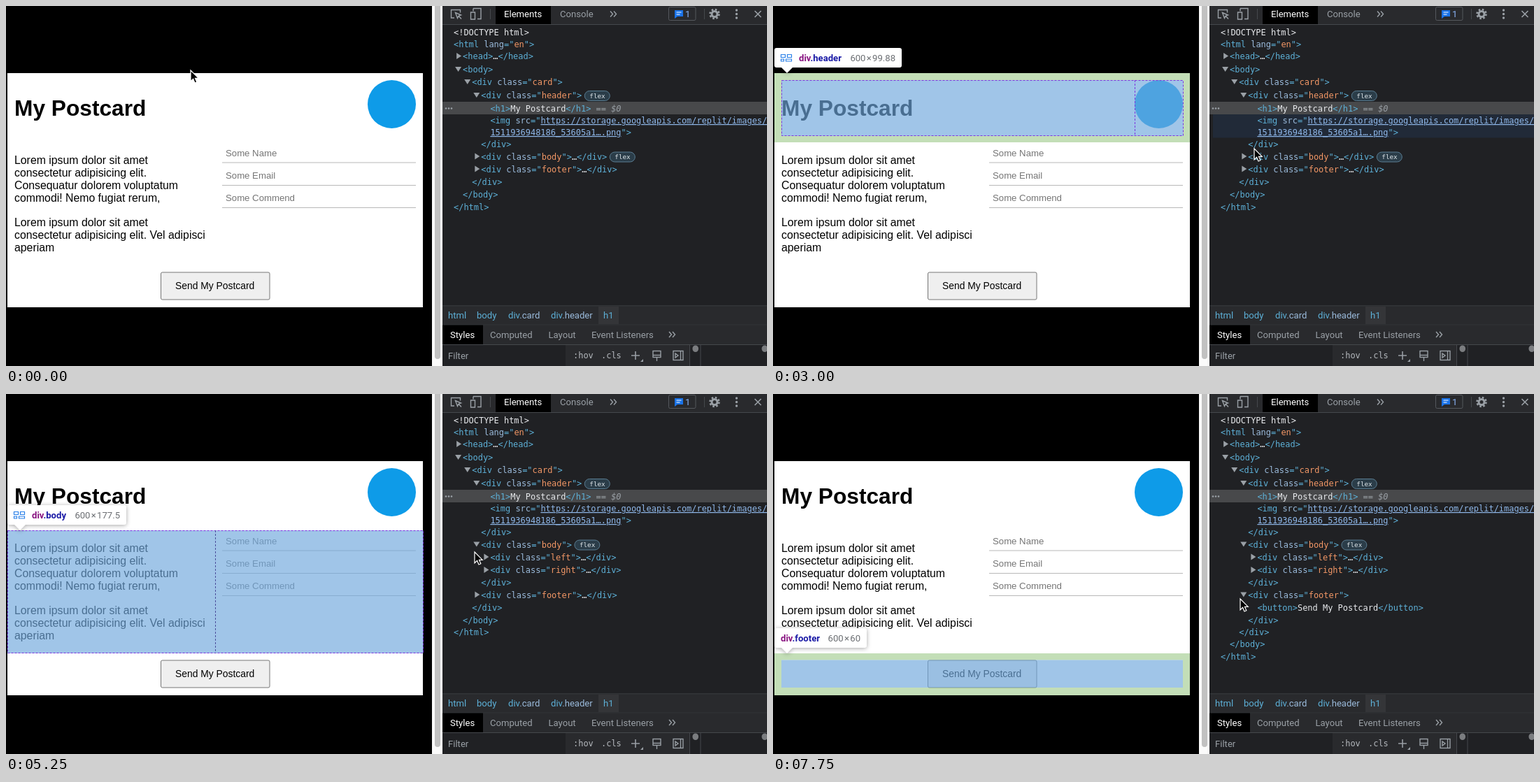
An HTML page for the animation above (8 s loop, 1088 by 515 pixels).

```html
<!DOCTYPE html>
<html lang="en">
<head>
<meta charset="utf-8">
<title>Inspecting a postcard</title>
<style>
  html, body { margin: 0; width: 100%; height: 100%; overflow: hidden; background: #000; }
  svg { display: block; width: 1088px; height: 515px; }
  text { white-space: pre; }
  .page { font: 15.84px "Liberation Sans", Arial, sans-serif; }
  .page .title { font-size: 31.68px; font-weight: bold; }
  .page .hint { font-size: 13.2px; fill: #757575; }
  .page .send { font-size: 13.86px; }
  .ui { font: 13.1px Roboto, "Liberation Sans", sans-serif; fill: #9aa0a6; }
  .ui .on { fill: #fff; }
  .crumbs { fill: #5db0d7; }
  .crumbs .cls { fill: #9bbbdc; }
  .code { font: 11.96px "DejaVu Sans Mono", monospace; fill: #e8eaed; }
  .tag { fill: #5db0d7; }
  .attr { fill: #9bbbdc; }
  .val { fill: #f29766; }
  .link { fill: #8fb8ea; text-decoration: underline; }
  .dim { fill: #9aa0a6; font-style: italic; }
  .badge { font-size: 9.3px; fill: #dfe6ea; }
  .twist { fill: #9aa0a6; }
  .line { fill: none; stroke: #9aa0a6; stroke-width: 1.4; }
  .content { fill: rgba(111, 168, 220, .66); }
  .padding { fill: rgba(147, 196, 125, .55); fill-rule: evenodd; }
  .margin { fill: rgba(246, 178, 107, .66); fill-rule: evenodd; }
  .flex { fill: none; stroke: #7d35e0; stroke-dasharray: 3 2; }
  .tip { font: 13.1px Roboto, "Liberation Sans", sans-serif; fill: #6b6e72; }
  .tip .el { font-weight: bold; fill: #881280; }
  .tip .el tspan { fill: #1a1aa6; }
  .bubble { fill: #fff; filter: drop-shadow(0 1px 3px rgba(0, 0, 0, .35)); }
</style>
</head>
<body>
<svg viewBox="0 0 1088 515">
  <rect width="1088" height="515"/>

  <g class="page">
    <rect x="2" y="96" width="594" height="335" fill="#fff"/>
    <text class="title" x="12" y="157">My Postcard</text>
    <circle cx="551.5" cy="140.5" r="34.5" fill="#0e9be8"/>
    <text x="12" y="225.5">Lorem ipsum dolor sit amet</text>
    <text x="12" y="244">consectetur adipisicing elit.</text>
    <text x="12" y="262">Consequatur dolorem voluptatum</text>
    <text x="12" y="280">commodi! Nemo fugiat rerum,</text>
    <text x="12" y="315">Lorem ipsum dolor sit amet</text>
    <text x="12" y="333">consectetur adipisicing elit. Vel adipisci</text>
    <text x="12" y="351">aperiam</text>
    <text class="hint" x="314" y="215">Some Name</text>
    <text class="hint" x="314" y="247">Some Email</text>
    <text class="hint" x="314" y="279">Some Commend</text>
    <path d="M309 224h277M309 256.500h277M309 288.500h277" stroke="#b8b8b8"/>
    <rect x="221.500" y="381" width="155.500" height="39" rx="2" fill="#efefef" stroke="#767676"/>
    <text class="send" x="242" y="405">Send My Postcard</text>
  </g>

  <rect x="609" width="15" height="515" fill="#fafafa"/>
  <rect x="613" y="-10" width="8" height="515" rx="4" fill="#c1c1c1"/>

  <g class="ui">
    <rect x="624" width="464" height="515" fill="#202124"/>
    <rect x="624" width="464" height="26" fill="#292a2d"/>
    <path d="M624 26.500h464M624 429h464M624 456h464M624 484.500h464" stroke="#45484c"/>
    <rect x="700" width="79" height="26" fill="#000"/>
    <g class="line">
      <path d="M641 17h-4.500v-11.500h13v4M642.500 9.500l8 3.500-3.500 1.200-1.500 3.300zM647 14l4 4.500"/>
      <path d="M668 3.500h11v15h-5M668 3.500v4M664.500 9h6v10h-6z"/>
      <path d="M692.500 4v15M998.500 4v15" stroke="#45484c" stroke-width="1"/>
      <path d="M864 7.500l3.500 4-3.500 4M869 7.500l3.500 4-3.500 4M948 466l3.500 4-3.500 4M953 466l3.500 4-3.500 4"/>
      <rect x="947.500" y="1.500" width="38.500" height="19" rx="2" stroke="#55585d" stroke-width="1"/>
      <circle cx="1013" cy="11.500" r="4" stroke-width="3"/>
      <circle cx="1013" cy="11.500" r="6.500" stroke-width="2.500" stroke-dasharray="2.550"/>
      <path d="M1070.500 7l9 9M1079.500 7l-9 9" stroke-width="1.600"/>
      <path d="M894 500h12M900 494v12" stroke-width="1.600"/>
      <path d="M925 493.500h11v6h-11zM925 499.500v3h11v-3M930.500 503v5M954 493.500h14v13h-14zM964.500 493.500v13M957 497l4 3-4 3z"/>
    </g>
    <path d="M956 6h12v9h-8l-4 3z" fill="#1a73e8"/>
    <path d="M958.500 9h7M958.500 12h5" stroke="#fff"/>
    <text x="971" y="16" fill="#8ab4f8">1</text>
    <g class="twist">
      <circle cx="1044.500" cy="6" r="1.700"/><circle cx="1044.500" cy="11.500" r="1.700"/><circle cx="1044.500" cy="17" r="1.700"/>
    </g>
    <text class="on" x="712" y="16">Elements</text>
    <text x="792" y="16">Console</text>

    <rect x="624" y="429.500" width="464" height="26" fill="#292a2d"/>
    <rect x="847" y="430" width="29" height="25" fill="#343538"/>
    <g class="crumbs">
      <text x="632" y="447">html</text>
      <text x="673" y="447">body</text>
      <text x="718" y="447">div<tspan class="cls">.card</tspan></text>
      <text x="779" y="447">div<tspan class="cls">.header</tspan></text>
      <text x="854" y="447">h1</text>
    </g>
    <rect x="624" y="456.500" width="464" height="27.500" fill="#292a2d"/>
    <rect x="624" y="456.500" width="58" height="27.500" fill="#000"/>
    <path d="M948 466l3.500 4-3.500 4M953 466l3.500 4-3.500 4" class="line"/>
    <text class="on" x="635" y="474.500">Styles</text>
    <text x="692" y="474.500">Computed</text>
    <text x="775.500" y="474.500">Layout</text>
    <text x="837" y="474.500">Event Listeners</text>

    <rect x="800" y="485" width="177" height="30" fill="#292a2d" style="mix-blend-mode:lighten"/>
    <text x="632" y="504.500">Filter</text>
    <g class="code" font-weight="bold" style="fill:#b4b8bd">
      <text x="811" y="504">:hov</text>
      <text x="851" y="504">.cls</text>
    </g>
    <path d="M911 505v4h-4z" class="twist"/>
    <path d="M977.500 485v30M993 485v30" stroke="#45484c"/>
    <rect x="981.500" y="485.500" width="8.500" height="9.500" rx="4.200" fill="#7b7d80"/>
    <rect x="1080.500" y="485.500" width="8.500" height="9.500" rx="4.200" fill="#7b7d80"/>
  </g>

  <rect x="624" y="137" width="464" height="18" fill="#48494b"/>
  <rect id="hover" x="629" width="459" fill="#212a38"/>
  <g class="twist"><circle cx="629" cy="146.500" r="1.300"/><circle cx="633" cy="146.500" r="1.300"/><circle cx="637" cy="146.500" r="1.300"/></g>
  <g id="tree" class="code"></g>
  <g id="overlays"></g>
  <path id="cursor" d="M0 0V15.800L3.600 12.400L6 18L8.800 16.800L6.400 11.300H11.200Z" fill="#000" stroke="#fff" stroke-width="1.200"/>
</svg>
<script>
const $ = id => document.getElementById(id);
const slots = [37.5, 55, 72, 91, 109, 128, 146.5, 164, 181, 197.5, 215.5, 233.5, 252, 269.5, 287.5, 306, 324, 341, 358, 376];
const CHAR = 7.2;

const span = (cls, text) => `<tspan class="${cls}">${text}</tspan>`;
const safe = s => s.replace(/</g, '&lt;').replace(/>/g, '&gt;');

function paint(code) {
  return code.replace(/(<\/?\w+|>)|( \w+)="([^"]*)"|(<!)/g, (all, tag, attr, val) =>
    tag ? span('tag', safe(tag))
    : attr ? span('attr', attr) + span('tag', '="') + span('val', val) + span('tag', '"')
    : safe(all));
}

const put = (x, y, inner) => `<text x="${x}" y="${y + 4}">${inner}</text>`;

// kind: "+" collapsed, "-" expanded; "f" adds the flex badge
function row(slot, depth, code, kind = '') {
  const x = 640 + 13.1 * depth, y = slots[slot];
  let out = put(x, y, paint(code));
  if (kind[0] === '+') out += `<path class="twist" d="M${x - 9} ${y - 5}l7 4.500-7 4.500z"/>`;
  if (kind[0] === '-') out += `<path class="twist" d="M${x - 11} ${y - 4}h9l-4.500 7z"/>`;
  if (kind[1] === 'f') {
    const bx = x + code.length * CHAR + 4;
    out += `<rect x="${bx}" y="${y - 6.5}" width="36" height="14" rx="7" fill="#2b3d49" stroke="#5a7d92"/>` +
      `<text class="badge" x="${bx + 7}" y="${y + 3.5}">flex</text>`;
  }
  return out;
}

const top10 =
  put(640, slots[0], '&lt;!DOCTYPE html&gt;') +
  row(1, 0, '<html lang="en">') +
  row(2, 1, '<head>…</head>', '+') +
  row(3, 1, '<body>', '-') +
  row(4, 2, '<div class="card">', '-') +
  row(5, 3, '<div class="header">', '-f') +
  put(692.4, slots[6], paint('<h1>My Postcard</h1>') + span('dim', ' == $0')) +
  put(692.4, slots[7], span('tag', '&lt;img') + span('attr', ' src') + span('tag', '="') +
    span('link', 'https://storage.googleapis.com/replit/images/')) +
  put(692.4, slots[8], span('link', '1511936948186_53605a1….png') + span('tag', '"&gt;')) +
  row(9, 3, '</div>');

const closing = slot => row(slot, 2, '</div>') + row(slot + 1, 1, '</body>') + row(slot + 2, 0, '</html>');
const footer = (slot, open) => open
  ? row(slot, 3, '<div class="footer">', '-') + row(slot + 1, 4, '<button>Send My Postcard</button>') +
    row(slot + 2, 3, '</div>') + closing(slot + 3)
  : row(slot, 3, '<div class="footer">…</div>', '+') + closing(slot + 1);
const openBody =
  row(10, 3, '<div class="body">', '-f') +
  row(11, 4, '<div class="left">…</div>', '+') +
  row(12, 4, '<div class="right">…</div>', '+') +
  row(13, 3, '</div>');
const tails = [
  row(10, 3, '<div class="body">…</div>', '+f') + footer(11, false),
  openBody + footer(14, false),
  openBody + footer(14, true)
];
$('tree').innerHTML = top10 + tails.map(t => `<g>${t}</g>`).join('');

const frame = ([x, y, w, h]) => `M${x} ${y}h${w}v${h}h${-w}z`;
const fill = (cls, ...boxes) => `<path class="${cls}" d="${boxes.map(frame).join('')}"/>`;

function tip(x, target, w, tag, cls, size, flex) {
  const y = target - 36, tx = x + (flex ? 35 : 9);
  const icon = flex ? `<path d="M${x + 9.5} ${y + 9.5}h6v4h-6zM${x + 18.5} ${y + 9.5}h6v4h-6zM${x + 9.5} ${y + 16}h4v3h-4zM${x + 16.5} ${y + 16}h8v3h-8z" fill="none" stroke="#2a80e8" stroke-width="1.200"/>` : '';
  return `<g class="tip"><path class="bubble" d="M${x + 3} ${y}h${w - 6}q3 0 3 3v22q0 3-3 3H${x + 26}l-8 8-8-8H${x + 3}q-3 0-3-3v-22q0-3 3-3z"/>${icon}` +
    `<text class="el" x="${tx}" y="${y + 18.5}">${tag}<tspan>${cls}</tspan></text>` +
    `<text x="${x + w - 9}" y="${y + 18.5}" text-anchor="end">${size.replace('×', '\u200a×\u200a')}</text></g>`;
}

const headBox = [12, 106, 574.5, 80], bodyBox = [2, 195, 594.5, 176];
const heading = [12, 127.5, 188, 37], leftBox = [12, 195, 277, 176], rightBox = [309, 195, 277, 176];
const footBox = [12, 380.5, 574, 39.5];
const overlays = {
  h1: fill('margin', [12, 106, 188, 80], heading) + fill('content', heading) + tip(12, 106, 118, 'h1', '', '190.27×37'),
  img: fill('content', [517, 106, 69, 69.5]) + tip(517, 106, 99, 'img', '', '70×70'),
  header: fill('padding', [2, 96, 594, 99], headBox) + fill('content', headBox) +
    `<path class="flex" d="${frame([12.5, 106.5, 574, 79])}M517.500 106v80"/>` +
    tip(2, 96, 182, 'div', '.header', '600×99.88', true),
  body: fill('content', bodyBox) +
    `<path class="flex" d="${frame([2.5, 195.5, 594, 175])}"/><path class="flex" d="M299.500 195v176" style="stroke:#4c4f9c"/>` +
    tip(2, 195, 170, 'div', '.body', '600×177.5', true),
  left: fill('padding', [2, 195, 297, 176], leftBox) + fill('content', leftBox) + tip(2, 195, 136, 'div', '.left', '300×177.5'),
  right: fill('padding', [299, 195, 297, 176], rightBox) + fill('content', rightBox) + tip(299, 195, 144, 'div', '.right', '300×177.5'),
  footer: fill('padding', [2, 371, 594, 60], footBox) + fill('content', footBox) + tip(2, 371, 132, 'div', '.footer', '600×60')
};
$('overlays').innerHTML = Object.entries(overlays).map(([id, art]) => `<g id="${id}">${art}</g>`).join('');

// time, cursor x, cursor y, highlighted element, hovered slot, open tree levels
const steps = [
  [0, 264, 92], [250, 204, 71], [750, 400, 203],
  [1000, 640, 146, 'h1'], [1250, 655, 148, 'h1'],
  [1500, 664, 160, 'img', 7], [1750, 668, 164, 'img', 7], [2000, 672, 167, 'img', 7],
  [2250, 677, 170, 'img', 7], [2500, 681, 173, 'img', 7], [2750, 685, 176, 'img', 7],
  [3000, 688, 204, 'header', 7], [3250, 685, 205, 'header', 9], [3500, 680, 206, 'header', 9],
  [3750, 674, 207, 'header', 9], [4000, 668, 207, 'header', 9], [4250, 664, 207, 'header', 9],
  [4500, 666, 209, 'body', 10], [4750, 667, 213, 'body', 10, 1], [5250, 670, 226, 'body', 0, 1],
  [5500, 674, 236, 'left', 11, 1], [5750, 679, 242, 'left', 11, 1], [6000, 682, 254, 'right', 12, 1],
  [6250, 681, 270, 'body', 13, 1], [6750, 681, 274, 'body', 13, 1], [7000, 681, 275, 'body', 13, 1],
  [7250, 676, 281, 'footer', 14, 1], [7500, 670, 287, 'footer', 14, 1], [7750, 668, 293, 'footer', 0, 2]
];

const show = (el, on) => el.style.display = on ? '' : 'none';
const branches = [...$('tree').children].slice(-tails.length);
const start = performance.now();

function draw() {
  const t = Math.max(0, performance.now() - start) % 8000;
  const [, x, y, target, slot = 0, level = 0] = steps.findLast(s => s[0] <= t);
  $('cursor').setAttribute('transform', `translate(${x} ${y})`);
  for (const id in overlays) show($(id), id === target);
  branches.forEach((g, i) => show(g, i === level));
  show($('hover'), slot);
  $('hover').setAttribute('y', slots[slot] - 9);
  $('hover').setAttribute('height', slot === 7 ? 33.5 : 18);
  requestAnimationFrame(draw);
}
draw();
</script>
</body>
</html>
```
